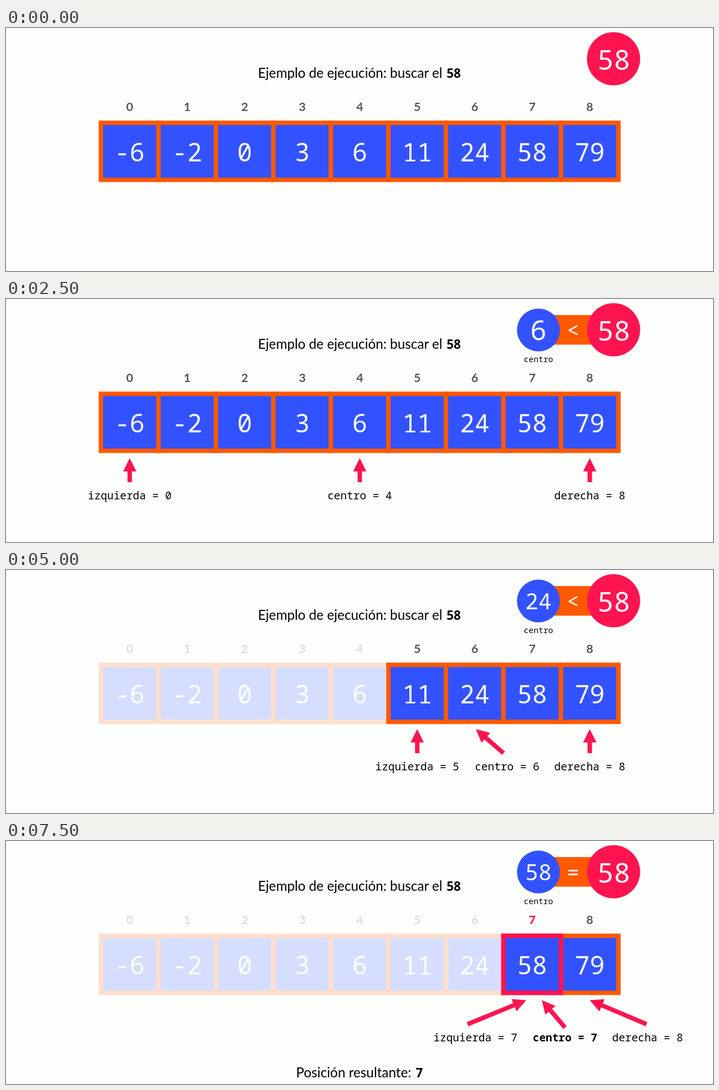
These frames come from a looping animation (1276 px wide and 439 px high, 10000 ms). An HTML page:

```html
<!DOCTYPE html>
<html lang="es">
<head>
<meta charset="utf-8">
<title>Búsqueda binaria</title>
<style>
  html, body { margin: 0; width: 100%; height: 100%; overflow: hidden; background: #fdfffc; }
  svg { display: block; }
  .mono { font-family: "Noto Sans Mono", monospace; text-anchor: middle; }
  .body { font: 24.3px Lato, sans-serif; }
  .key { font: bold 22.5px "Noto Sans", sans-serif; text-anchor: middle; }
  .index { font: bold 21.5px Lato, sans-serif; text-anchor: middle; }
</style>
</head>
<body>
<svg id="stage" width="1276" height="439" viewBox="0 0 1276 439"></svg>
<script>
const BLUE = '#3352ff', ORANGE = '#ff5900', PINK = '#ff1450', WHITE = '#fdfffc';
const values = [-6, -2, 0, 3, 6, 11, 24, 58, 79];
const target = 58, stepTime = 2500;
const cellX = i => 223.3 + 103.78 * i;

// Each pointer: [text, label center, arrow tail x, tail y, tip x]
const upright = (text, i) => [text, cellX(i), cellX(i), 331, cellX(i)];
const steps = [
  { low: 0, pointers: [] },
  { low: 0, mid: 4, sign: '<', pointers: [
    upright('izquierda = 0', 0), upright('centro = 4', 4), upright('derecha = 8', 8)] },
  { low: 5, mid: 6, sign: '<', pointers: [
    upright('izquierda = 5', 5), ['centro = 6', 904.5, 898, 331, 848], upright('derecha = 8', 8)] },
  { low: 7, mid: 7, sign: '=', found: 7, pointers: [
    ['izquierda = 7', 847, 833, 331, 939], ['centro = 7', 1009, 1009, 337, 967],
    ['derecha = 8', 1158, 1156, 331, 1053.5]] }
];

const text = (cls, x, y, str, attrs = '') =>
  `<text class="${cls}" x="${x}" y="${y}" ${attrs}>${String(str).replace('<', '&lt;')}</text>`;
const mono = (x, y, size, str, fill = WHITE, weight = fill === WHITE ? 500 : 400) =>
  text('mono', x, y, str, `font-size="${size}" fill="${fill}" font-weight="${weight}"`);
const circle = (x, y, r, fill) => `<circle cx="${x}" cy="${y}" r="${r}" fill="${fill}"/>`;

function arrow(x, y, tipX, tipY = 287.5) {
  const length = Math.hypot(tipX - x, tipY - y);
  const angle = Math.atan2(tipY - y, tipX - x) * 180 / Math.PI;
  return `<path transform="translate(${tipX} ${tipY}) rotate(${angle})" fill="${PINK}"
    d="M0 0L-24 -12V-4H${-length}V4H-24V12Z"/>`;
}

function cell(i, { low, found }) {
  const active = i >= low, x = cellX(i);
  const border = i === found ? PINK : active ? ORANGE : '#ffdecc';
  const label = i === found ? PINK : active ? '#555' : '#ddd';
  return text('index', x, 150, i, `fill="${label}"`) +
    `<rect x="${x - 52}" y="171.3" width="103.8" height="103" stroke-width="8"
      fill="${active ? BLUE : '#d6deff'}" stroke="${border}"/>` +
    mono(x, 240.7, 45, values[i]);
}

function comparison({ mid, sign }) {
  const value = values[mid], single = value < 10;
  return `<rect x="961" y="29" width="135" height="53.5" fill="${ORANGE}"/>` +
    circle(961, 56, 38.8, BLUE) +
    mono(961, single ? 74 : 71, single ? 49 : 40, value) +
    mono(1023.5, 70, 38, sign) +
    mono(961, 114, 14.7, 'centro', '#000');
}

function scene(step) {
  const order = values.map((_, i) => i);
  if (step.found) order.push(step.found);  // highlighted border stays on top
  return text('body', 454.8, 90, 'Ejemplo de ejecución: buscar el') +
    text('key', 808, 90, target) +
    order.map(i => cell(i, step)).join('') +
    (step.sign ? comparison(step) : '') +
    circle(1096.5, 55.6, 48, PINK) + mono(1097, 74.5, 49.5, target) +
    step.pointers.map(([label, center, x, y, tipX]) => arrow(x, y, tipX) +
      mono(center, 362, 19.4, label, '#000', step.found && label[0] === 'c' ? 700 : 400)).join('') +
    (step.found ? text('body', 523.6, 427, 'Posición resultante:') + text('key', 746, 427, step.found) : '');
}

const stage = document.getElementById('stage');
let shown = -1;
function draw() {
  const current = Math.floor(performance.now() / stepTime) % steps.length;
  if (current !== shown) stage.innerHTML = scene(steps[shown = current]);
  requestAnimationFrame(draw);
}
draw();
</script>
</body>
</html>
```
